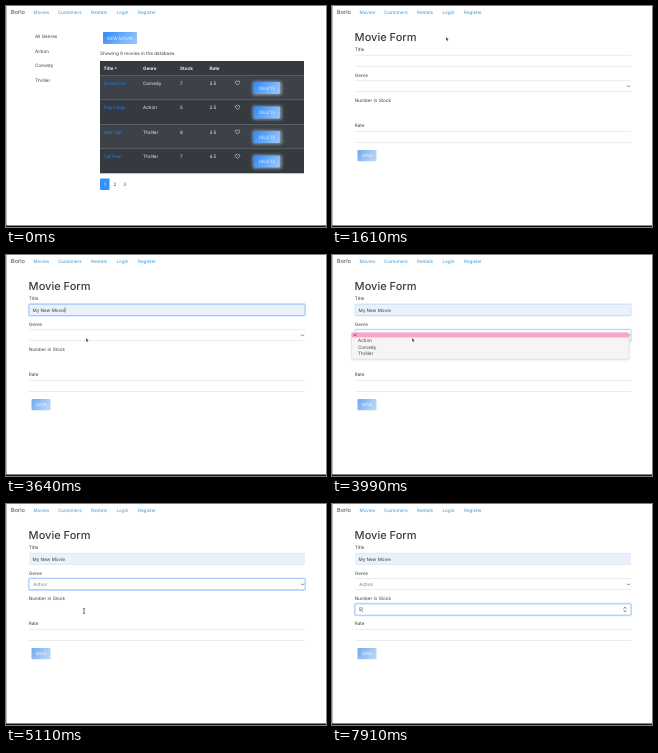
An HTML page for the animation above (8000 ms loop, 320 px wide and 221 px high).

```html
<!DOCTYPE html>
<html lang="en">
<head>
<meta charset="utf-8">
<title>Movie form demo</title>
<style>
  html, body { margin: 0; width: 100%; height: 100%; overflow: hidden; background: #fff; }
  svg { display: block; width: 100%; height: 100%; }
  text { font-family: Inter, "Open Sans", sans-serif; font-size: 4.6px; fill: #383c40; text-rendering: geometricPrecision; white-space: pre; }
  .nav, .link { fill: #3894d6; }
  .link { fill: #1f84ee; }
  .on-dark { fill: #f1f3f4; }
  .bold { font-weight: 700; }
  .btn { font-size: 4.4px; fill: #fff; fill-opacity: .85; text-anchor: middle; }
  .mid { text-anchor: middle; }
  .suggest { font-size: 3.75px; font-weight: 600; fill: #222; }
  .line { stroke: #e2e4e6; stroke-width: .7; }
  .icon { fill: none; stroke: #444; stroke-width: .7; stroke-linecap: round; stroke-linejoin: round; }
</style>
</head>
<body>
<svg id="stage" viewBox="0 0 320 221" xmlns="http://www.w3.org/2000/svg"></svg>
<script>
const LOOP = 8000, STEP = 70;
const stage = document.getElementById('stage');

const text = (x, y, s, cls = '', extra = '') => `<text x="${x}" y="${y}" class="${cls}" ${extra}>${s}</text>`;
const rect = (x, y, w, h, fill, extra = '') =>
  `<rect x="${x}" y="${y}" width="${w}" height="${h}" fill="${fill}" ${extra}/>`;
const path = (d, extra = 'class="icon"') => `<path d="${d}" ${extra}/>`;
const group = (id, body) => `<g id="${id}">${body}</g>`;
const button = (x, y, w, h, label, fill, extra = '') =>
  rect(x, y, w, h, fill, `rx="1" ${extra}`) + text(x + w / 2, y + h / 2 + 1.6, label, 'btn');
const gradient = (id, from, to) =>
  `<linearGradient id="${id}" x2="1" y2=".35"><stop stop-color="${from}"/><stop offset="1" stop-color="${to}"/></linearGradient>`;
const hline = y => `<line x1="23" x2="299" y1="${y}" y2="${y}" class="line"/>`;

const defs = `<defs>
  ${gradient('blue', '#2f88f8', '#8cc1fc')}
  ${gradient('pale', '#72a9ec', '#b4d4f8')}
  <filter id="soft" x="-30%" y="-60%" width="160%" height="220%"><feGaussianBlur stdDeviation="1.7"/></filter>
</defs>`;

function navBar() {
  const links = [['Movies', 27.5], ['Customers', 52], ['Rentals', 85], ['Login', 110.5], ['Register', 132]];
  return text(5, 8.4, 'Borlo', '', 'style="font-size:5.6px"') +
    links.map(([s, x]) => text(x, 8, s, 'nav')).join('');
}

function tableRow([title, genre, stock, rate], i) {
  const top = 69.3 + i * 24.5, base = top + 9.5;
  return rect(94, top, 204, 24.5, i % 2 ? '#343a40' : '#3c4247') +
    rect(94, top, 204, .4, '#484f56') +
    text(97.5, base, title, 'link') +
    [[137, genre], [174, stock], [203.5, rate]].map(([x, s]) => text(x, base, s, 'on-dark')).join('') +
    path(`M231.5 ${base + .3}l-2-2.1c-1.1-1.7 1.1-3 2-1.2c.9-1.8 3.1-.5 2 1.2z`,
      'fill="none" stroke="#f1f3f4" stroke-width=".55"') +
    rect(246.5, top + 6, 29.5, 14, '#aebccb', 'rx="2" opacity=".65" filter="url(#soft)"') +
    button(248, top + 6.8, 26, 12, 'DELETE', 'url(#blue)');
}

function listPage() {
  const rows = [
    ['Snowboot', 'Comedy', 7, 3.5],
    ['Fog Lamp', 'Action', 5, 2.5],
    ['Wet Oak', 'Thriller', 8, 3.5],
    ['Tall Pear', 'Thriller', 7, 4.5]
  ];
  const heads = [['Title', 97.5], ['Genre', 137], ['Stock', 174], ['Rate', 203.5]];
  return ['All Genres', 'Action', 'Comedy', 'Thriller'].map((s, i) => text(29, 32.2 + i * 14.5, s)).join('') +
    button(97, 26, 34, 12, 'NEW MOVIE', 'url(#blue)', 'id="newBtn"') +
    text(94, 49, 'Showing 9 movies in the database.') +
    rect(94, 55, 204, 14.3, '#343a40') +
    heads.map(([s, x]) => text(x, 64.2, s, 'on-dark bold')).join('') +
    path('M108.6 62.6l1.1-1.5 1.1 1.5z', 'fill="#f1f3f4"') +
    rows.map(tableRow).join('') +
    path('M95 172.5h8.5v11.5h-8.5q-1 0-1-1v-9.5q0-1 1-1z', 'fill="#3391fb"') +
    text(98.8, 179.8, '1', 'on-dark mid') + text(109, 179.8, '2', 'mid') + text(118.6, 179.8, '3', 'mid');
}

const focusRing = (id, y) => group(id,
  rect(22.5, y - .6, 277, 12.4, 'none', 'rx="1.4" stroke="#cfe4fc" stroke-width="1.2"') +
  rect(23, y, 276, 11.2, 'none', 'rx="1" stroke="#8fbff5" stroke-width=".7"'));

function formPage() {
  const labels = ['Title', 'Genre', 'Number in Stock', 'Rate'];
  return text(22.6, 35, 'Movie Form', '', 'style="font-size:11px;font-weight:500"') +
    labels.map((s, i) => text(22.8, 45.2 + i * 25.4, s)).join('') +
    rect(23, 49.3, 276, 11.2, '#e9f1fd', 'id="filled" rx="1"') +
    [49.3, 60.5, 74.6, 85.6, 125.4, 136.5].map(hline).join('') +
    focusRing('ringTitle', 49.3) + focusRing('ringGenre', 74.6) + focusRing('ringStock', 99.9) +
    text(26.5, 56.7, 'My New Movie', '', 'id="titleText"') +
    text(27.3, 81.9, 'Action', '', 'id="genreText" style="fill:#70757a"') +
    text(26.8, 107.2, '5', '', 'id="stockText"') +
    path('M295.3 79.9l1.2 1.2 1.2-1.2') +
    group('spinner', path('M292 104.4l1-1.3 1 1.3M292 106.6l1 1.3 1-1.3')) +
    rect(26.4, 52.2, .5, 5.4, '#333', 'id="caret"') +
    button(25.5, 144, 19, 11.2, 'SAVE', 'url(#pale)');
}

function suggestions() {
  const items = ['My New Movie', 'My New Movie+', 'Express- Advanced Topics',
    'Asynchronous JavaScript', 'Deployment', 'Pagination, Filtering, and Sorting'];
  return rect(22.8, 62, 72, 67.5, '#fff') + rect(23, 129, 71.5, .6, '#dcdcdc') + rect(94.6, 62, .3, 67, '#ececec') +
    items.map((s, i) => text(26, 70.1 + i * 10.6, s, 'suggest')).join('');
}

function genreMenu() {
  return rect(20, 78.5, 277, 26, '#777', 'rx="1.5" opacity=".3" filter="url(#soft)"') +
    rect(19.5, 77.5, 277.5, 26.5, '#f5f5f5', 'rx="1.2" stroke="#d5d5d5" stroke-width=".4"') +
    rect(19.6, 82.4, 277.3, 6.5, '#ff9fca', 'id="hover"') +
    path('M22 80.1l.8.9 1.3-2.2') +
    text(26, 87.2, 'Action', '', 'id="menuAction"') + text(26, 93.7, 'Comedy') + text(26, 100.2, 'Thriller');
}

function cursors() {
  const outline = 'stroke="#fff" stroke-width=".4" stroke-linejoin="round"';
  return group('cursor',
    path('M0 0v3.7l.9-.8.6 1.4.7-.3-.6-1.4h1.2z', `id="arrow" fill="#111" ${outline}`) +
    path('M0 0v2.8l-.8-.6-.5.4 1.3 1.9h2.2l.4-2.2-1.8-.6V0q-.4-.4-.8 0z',
      'id="hand" fill="#fff" stroke="#111" stroke-width=".4"') +
    path('M-.8-2.4q.8 0 .8.5q0-.5.8-.5M0-2v4M-.8 2.4q.8 0 .8-.5q0 .5.8.5', 'id="beam" class="icon"'));
}

stage.innerHTML = defs + rect(0, 0, 320, 221, '#fff') + navBar() +
  group('list', listPage()) + group('form', formPage()) +
  group('suggest', suggestions()) + group('menu', genreMenu()) +
  rect(0, 0, .6, 220, '#8a8a8a') + rect(0, 219.5, 320, 1.5, '#111') + cursors();

const el = {};
stage.querySelectorAll('[id]').forEach(n => el[n.id] = n);

// time, x, y of the pointer
const route = [
  [70, 140, 7], [770, 111, 27], [840, 111, 27], [1120, 114, 31], [1820, 114, 31],
  [2310, 85, 54], [2940, 85, 54], [3080, 84.5, 70], [3220, 84.5, 70],
  [3570, 80, 83], [3990, 80, 83], [4200, 82.6, 90], [4830, 82.6, 90],
  [5110, 78, 107], [5600, 78, 107], [5810, 77.2, 107], [5950, 78.2, 107], [6160, 77.2, 107.3]
];

const clamp = v => Math.min(1, Math.max(0, v));
const ease = v => v * v * (3 - 2 * v);
const ramp = (t, from, length) => ease(clamp((t - from) / length));
const within = (t, from, to) => t >= from && t < to;
const show = (id, on) => el[id].setAttribute('opacity', +on);

function pointerAt(t) {
  const i = route.findIndex(p => p[0] > t);
  if (i === 0) return route[0].slice(1);
  if (i < 0) return route[route.length - 1].slice(1);
  const [t0, x0, y0] = route[i - 1], [t1, x1, y1] = route[i];
  const k = ramp(t, t0, t1 - t0);
  return [x0 + (x1 - x0) * k, y0 + (y1 - y0) * k];
}

function drawPointer(t) {
  const [x, y] = pointerAt(t);
  const hand = t < 1470 && x > 97 && x < 131 && y > 26 && y < 38;
  const beam = within(t, 2240, 3010) || t >= 5040;
  el.cursor.setAttribute('transform', `translate(${x} ${y})`);
  show('cursor', within(t, 70, 7910));
  show('hand', hand);
  show('beam', beam);
  show('arrow', !hand && !beam);
}

function drawCaret(t) {
  const inStock = t >= 5390, typed = t >= 7840;
  const filled = within(t, 3220, 3990);
  const blink = inStock
    ? typed || within(t, 5390, 5950) || within(t, 6440, 7000) || t >= 7490
    : within(t, 2450, 3010) || filled;
  el.caret.setAttribute('x', filled ? 58.8 : typed ? 29.8 : 26.4);
  el.caret.setAttribute('y', inStock ? 103 : 52.2);
  show('caret', blink);
}

function draw(t) {
  const form = t >= 1470;
  show('list', !form);
  show('form', form);
  el.newBtn.setAttribute('fill', t >= 1330 ? '#2579e6' : 'url(#blue)');

  show('ringTitle', ramp(t, 2480, 150) - ramp(t, 3900, 150));
  show('ringGenre', ramp(t, 3900, 150) - ramp(t, 5380, 150));
  show('ringStock', ramp(t, 5380, 150));
  show('filled', t >= 3220);
  show('titleText', t >= 3080);
  show('genreText', t >= 4900);
  show('stockText', t >= 7840);
  show('spinner', t >= 5390);

  show('suggest', within(t, 2450, 3220));
  show('menu', t >= 3990 ? 1 - ramp(t, 4870, 240) : 0);
  const onAction = t >= 4480;
  el.hover.setAttribute('y', onAction ? 82.4 : 77.7);
  el.hover.setAttribute('height', onAction ? 6.5 : 4.7);
  el.menuAction.style.fill = onAction ? '#fff' : '';

  drawCaret(t);
  drawPointer(t);
}

function tick(now) {
  const t = now % LOOP;
  draw(Math.min(t - t % STEP, 7910));
  requestAnimationFrame(tick);
}
draw(0);
requestAnimationFrame(tick);
</script>
</body>
</html>
```
